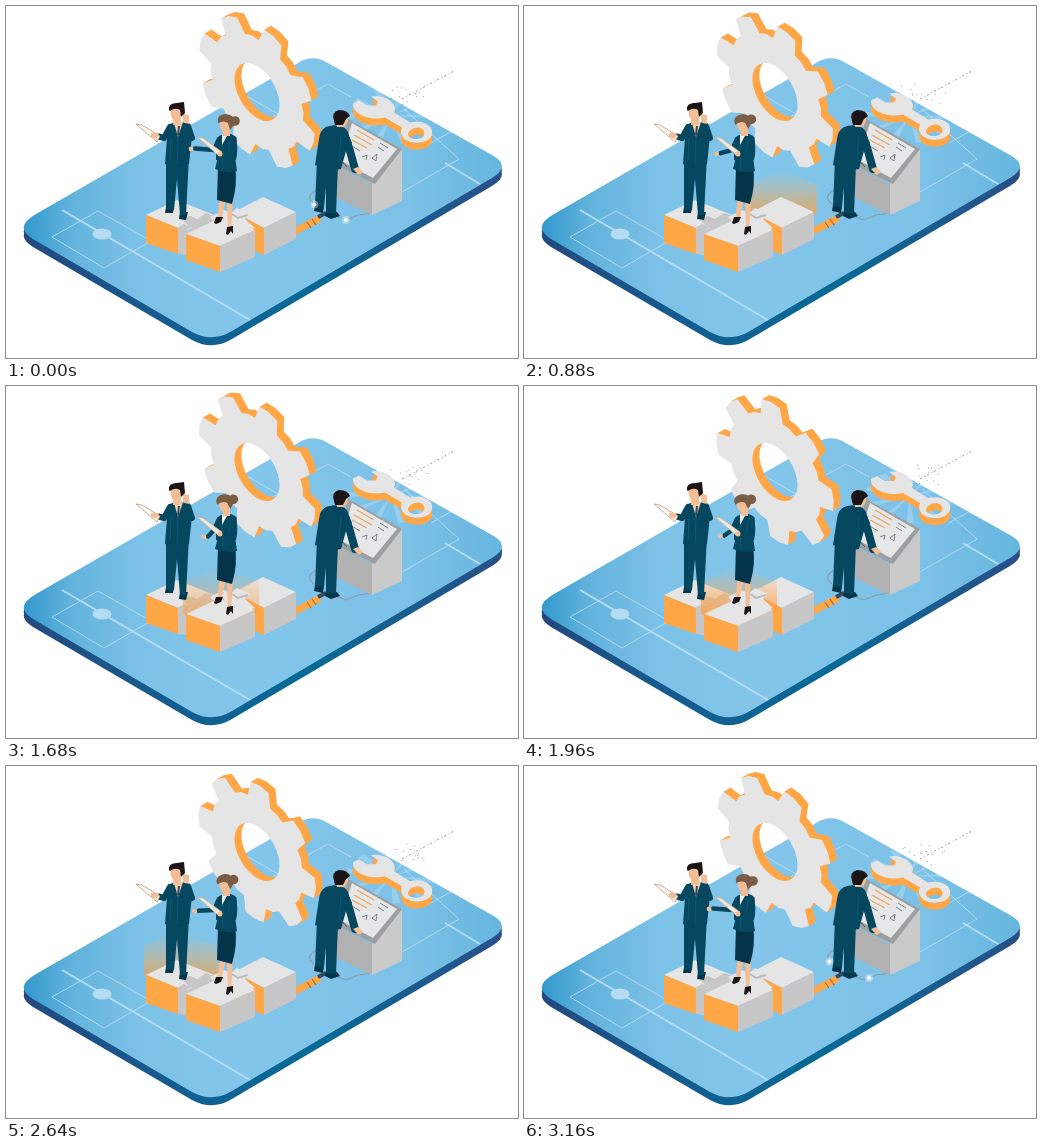
These frames come from a looping animation (512x352 px, 3.2 s). An HTML page:

```html
<!DOCTYPE html>
<html lang="en">
<head>
<meta charset="utf-8">
<title>Isometric teamwork</title>
<style>
html, body { margin: 0; width: 100%; height: 100%; overflow: hidden; background: #fff }
svg { display: block; width: 512px; height: 352px }
.suit { fill: #04475f }
.dark { fill: #03344a }
.skin { fill: #f3bd96 }
.hair { fill: #1b1416 }
.bun { fill: #7b5c45 }
.top { fill: #e5e5e6 }
.side { fill: #c7c7c8 }
.orange { fill: #ffa647 }
.white { fill: #f7f7f7 }
.sleeve { fill: none; stroke: #04475f; stroke-width: 8; stroke-linecap: round; stroke-linejoin: round }
.seam { fill: none; stroke: #0b6078; stroke-width: .8 }
.cable { fill: none; stroke: #8f9ba5; stroke-width: 1.1 }
.field { fill: none; stroke: #b4dcf3; stroke-width: .9 }
</style>
</head>
<body>
<svg viewBox="0 0 512 352">
  <defs>
    <linearGradient id="blue">
      <stop offset="0" stop-color="#3499cd"/><stop offset=".1" stop-color="#62b3dc"/>
      <stop offset=".24" stop-color="#7cc1e7"/><stop offset=".45" stop-color="#84c6eb"/>
      <stop offset=".8" stop-color="#7cc1e8"/><stop offset="1" stop-color="#66b6de"/>
    </linearGradient>
    <linearGradient id="rim">
      <stop offset="0" stop-color="#24497f"/><stop offset=".35" stop-color="#125f92"/>
      <stop offset=".6" stop-color="#076a94"/><stop offset="1" stop-color="#2a4f88"/>
    </linearGradient>
    <linearGradient id="fade" x1="0" y1="1" x2="0" y2="0">
      <stop offset=".2" stop-color="#ff9c38" stop-opacity=".9"/>
      <stop offset="1" stop-color="#ffb870" stop-opacity="0"/>
    </linearGradient>
    <path id="slab" d="M30 208L292 57Q306 48 321 56.500L486 149Q506 160 486 172L226 325Q206 337 186 326L27 233Q7 221 30 208Z"/>
    <clipPath id="onSlab"><use href="#slab"/></clipPath>
    <path id="wrenchFace" fill-rule="evenodd" d="M347 96L353 93L361 98L370 98L372 94L365 89Q375 87 384 93Q391 99 388 105L404 115Q418 112 425 120Q429 128 421 133Q409 138 399 132Q393 126 396 120L379 110Q365 113 354 107Q346 102 347 96ZM404 123Q399 128 406 131Q414 133 418 128Q420 122 413 120Q407 120 404 123Z"/>
    <path id="cog" fill-rule="evenodd"/>
  </defs>

  <use href="#slab" y="8" fill="url(#rim)"/>
  <use href="#slab" y="4" fill="url(#rim)"/>
  <use href="#slab" fill="url(#blue)"/>
  <g clip-path="url(#onSlab)">
    <path class="field" d="M46 231L92 205L145 235L98 262ZM232 85L272 108L250 121M300 90L322 78L345 91M398 103L453 153L396 186M425 137L448 124L478 141"/>
    <path class="field" style="stroke-width:2" d="M56 204L244 314M439 157L474 178"/>
    <ellipse cx="96" cy="228" rx="9.500" ry="5.500" fill="#b5dcf3"/>
    <g id="rays" fill="#fff"></g>
  </g>
  <path d="M396 93L448 65" stroke="#666" stroke-width=".7" stroke-dasharray="2 3 1 2"/>
  <g id="specks" fill="#888"></g>

  <g id="wrench">
    <use href="#wrenchFace" class="orange" y="7"/>
    <use href="#wrenchFace" class="orange" y="4"/>
    <use href="#wrenchFace" class="top"/>
  </g>

  <g id="gear"></g>

  <path class="cable" id="wireA" d="M312 183Q299 190 306 196L317 208"/>
  <path class="cable" id="wireB" d="M367 207L352 209L340 214L324 208"/>
  <path id="plug" d="M282 229L314 212" stroke="#ffa647" stroke-width="7"/>
  <path d="M301 216L305 222M306 213L310 219" stroke="#b96d22" stroke-width="1.200"/>
  <path d="M312 211L320 207" stroke="#34495a" stroke-width="4"/>

  <path class="glow" d="M226 207V179L257 164L293 179V207L258 223Z" fill="url(#fade)"/>
  <g>
    <path class="top" d="M228 206L257 191L290 206L258 222Z"/>
    <path class="orange" d="M228 206L258 222V249L228 235Z"/>
    <path class="side" d="M258 222L290 206V233L258 249Z"/>
  </g>
  <path class="glow" d="M138 209V179L170 166L212 180V212L174 227Z" fill="url(#fade)"/>
  <g>
    <path class="top" d="M140 209L171 194L213 211L179 225Z"/>
    <path class="orange" d="M140 209L172 222V248L140 237Z"/>
    <path class="side" d="M172 222L179 225L213 211V236L180 249L172 248Z"/>
    <path class="side" d="M171 222L178 218L185 221L179 225Z"/>
  </g>
  <path class="side" d="M176 214L184 210L191 213L200 207L212 211L206 216L190 224L183 220Z"/>
  <path class="glow" d="M177 228V196L214 180L253 196V226L214 242Z" fill="url(#fade)"/>
  <g>
    <path class="top" d="M204 211L218 204L225 207L231 202L244 208L239 213L249 222L224 231Z"/>
    <path class="top" d="M180 228L214 212L249 224L214 240Z"/>
    <path class="orange" d="M180 228L214 240V266L180 254Z"/>
    <path class="side" d="M214 240L249 224V251L214 266Z"/>
    <path d="M226 208L232 212L242 209" fill="none" stroke="#bcbcbd" stroke-width="2"/>
  </g>

  <g>
    <path d="M331 160L366 178V209L331 192Z" fill="#b1b1b2"/>
    <path d="M366 178L396 143V195L366 209Z" fill="#cacacb"/>
    <path d="M342 113L396 143L369 178L330 159Z" fill="#9d9fa1"/>
    <path d="M346 117L391 143L367 172L334 154Z" fill="#e6e7e8"/>
    <path d="M351 124L368 134M348 129L366 139M346 134L361 142" stroke="#f1a65a" stroke-width="1.300"/>
    <path d="M374 137L382 142M372 141L378 145M344 139L354 145M356 151L361 149L360 154M366 152L371 148L370 155Z" fill="none" stroke="#777" stroke-width=".9"/>
  </g>

  <g>
    <path class="dark" d="M309 199L318 200L317 207L308 205ZM320 204L331 206L334 210L325 213L319 210Z"/>
    <path class="suit" d="M311 153L332 157L330 208L320 207L320 181L318 201L309 200Z"/>
    <path class="suit" d="M320 121Q330 117 339 122L346 137L340 145L335 163Q323 165 309 159L313 133Q314 124 320 121Z"/>
    <path class="sleeve" d="M338 127L344 145L349 163"/>
    <path class="seam" d="M335 130L333 152L341 161"/>
    <path class="skin" d="M347 163L352 161L357 166L353 169ZM331 115H338V121H331Z"/>
    <ellipse class="skin" cx="336" cy="114" rx="6" ry="6.500"/>
    <path class="hair" d="M328 115Q325 106 333 104Q342 104 344 110L340 113L337 119L329 119Z"/>
  </g>

  <g>
    <path class="dark" d="M160 201H168L167 207L159 207ZM174 206H182L180 214L173 213Z"/>
    <path class="suit" d="M160 151L183 150L180 209H174L171 173L168 204H160Z"/>
    <path class="suit" d="M164 118Q172 113 182 118L186 130L183 158Q172 163 159 158L161 132Z"/>
    <path d="M168 117L177 116L172 131Z" fill="#f6d3b0"/>
    <path d="M172 120L171 129L173 130L174 120Z" fill="#324b5e"/>
    <path class="sleeve" style="stroke-width:6" d="M164 121L158 132L151 130M182 122L186 132L182 120"/>
    <path class="seam" d="M172 131L171 158M165 132L164 154"/>
    <path class="white" d="M130 118L136 119L154 130L151 136Z" stroke="#c08a58" stroke-width=".7"/>
    <path class="skin" d="M145 127L153 127L151 133L145 131ZM167 110H175V119H167ZM177 108L183 109L183 118L177 116Z"/>
    <ellipse class="skin" cx="170" cy="107" rx="5.500" ry="7.500"/>
    <path class="hair" d="M163 104Q162 97 171 97L178 96L179 107L175 111L174 104Q169 101 164 105Z"/>
  </g>

  <g>
    <path class="skin" d="M214 191L220 193L215 215H211ZM221 193L227 193L225 225H222Z"/>
    <path class="hair" d="M210 211L217 211L215 216L210 218L208 217ZM221 221L227 220L227 228L225 225L222 229L220 228Z"/>
    <path class="dark" d="M212 160L229 160Q232 178 226 198L211 194Z"/>
    <path class="suit" d="M213 130Q222 125 229 130Q233 141 230 154Q220 157 210 154L210 141Z"/>
    <path class="suit" d="M212 151H229L231 165Q220 168 209 163Z"/>
    <path class="white" d="M216 128H222L216 139Z"/>
    <path class="seam" d="M216 139L217 163M224 134L222 151"/>
    <path class="sleeve" id="farArm" style="stroke-width:4.500"/>
    <circle class="skin" id="hand" r="2.400"/>
    <path d="M191 131L197 132L216 146L213 150Z" fill="#efe6dd" stroke="#c9a786" stroke-width=".6"/>
    <path class="sleeve" style="stroke-width:5.500" d="M228 133L228 148L218 149"/>
    <circle class="skin" cx="214" cy="148" r="2.500"/>
    <path class="skin" d="M217 121H224V130H217Z"/>
    <g id="head">
      <ellipse class="skin" cx="219" cy="119" rx="5.200" ry="7"/>
      <path class="bun" d="M212 117Q210 109 219 108Q229 108 229 118L224 124L222 117Q218 114 212 117Z"/>
      <circle class="bun" cx="229" cy="115" r="4.800"/>
    </g>
  </g>

  <g id="sparks" fill="#fff"></g>
</svg>
<script>
const LOOP = 3200, STEP = 40;
const $ = id => document.getElementById(id);
const add = (parent, tag, attrs) => {
  const el = document.createElementNS('http://www.w3.org/2000/svg', tag);
  for (const k in attrs) el.setAttribute(k, attrs[k]);
  return parent.appendChild(el);
};
const set = (el, k, v) => el.setAttribute(k, v);
const clamp = v => Math.max(0, Math.min(1, v));
const pulse = (t, from, to) => Math.sin(Math.PI * clamp((t - from) / (to - from)));
const rand = n => { const v = Math.sin(n * 127.1) * 43758.5453; return v - Math.floor(v); };

// Eight-toothed wheel, drawn flat and laid into the isometric wall plane.
const PITCH = 45;
const polar = (r, deg) => {
  const a = deg * Math.PI / 180;
  return `${(r * Math.cos(a)).toFixed(2)} ${(r * Math.sin(a)).toFixed(2)}`;
};
const outline = [];
for (let a = 0; a < 360; a += PITCH)
  outline.push(...[[53, -14], [67, -9], [68, 0], [67, 9], [53, 14], [54, PITCH / 2]].map(([r, d]) => polar(r, a + d)));
set($('cog'), 'd', `M${outline.join('L')}ZM26 0A26 26 0 1 0 -26 0A26 26 0 1 0 26 0Z`);
const layers = [];
for (let d = 8; d >= 0; d--) {
  const plane = add($('gear'), 'g', { transform: `matrix(.866 .5 0 1 ${251 + d * .866} ${86 - d * .5})` });
  layers.push(add(plane, 'use', { href: '#cog', class: d ? 'orange' : 'top' }));
}

for (let i = 0; i < 10; i++)
  add($('rays'), 'path', { d: 'M0 0L44 -4V4Z', opacity: .2, transform: `rotate(${i * 36})` });
const specks = Array.from({ length: 16 }, () => add($('specks'), 'circle', { r: .5 }));
const sparks = [0, 1, 2].map(() => {
  const g = add($('sparks'), 'g', {});
  add(g, 'circle', { r: 4, opacity: .35 });
  add(g, 'circle', { r: 1.9 });
  return g;
});

const glows = [...document.querySelectorAll('.glow')];
const spans = [[560, 1300, .9], [2300, 3020, .85], [1400, 2520, .9]];

function moveSpark(g, wire, p, back) {
  set(g, 'opacity', p > 0 && p < 1 ? 1 : 0);
  const q = wire.getPointAtLength(wire.getTotalLength() * (back ? 1 - p : p));
  set(g, 'transform', `translate(${q.x} ${q.y})`);
}

function draw(t) {
  const turn = -119 - 4 * PITCH * t / LOOP;
  layers.forEach(l => set(l, 'transform', `rotate(${turn})`));
  set($('rays'), 'transform', `translate(385 110) scale(1 .62) rotate(${t * 36 / 800})`);

  glows.forEach((g, i) => {
    const [from, to, peak] = spans[i];
    set(g, 'opacity', pulse(t, from, to) * peak);
  });

  const charge = (t + 200) % LOOP / 320;
  moveSpark(sparks[0], $('wireA'), charge);
  moveSpark(sparks[1], $('wireB'), charge);
  moveSpark(sparks[2], $('plug'), (t - 480) / 400, true);

  const wave = (1 - Math.cos(t / LOOP * 2 * Math.PI)) / 2;
  const hx = 185 + 13 * wave, hy = 143 + 8 * wave;
  set($('farArm'), 'd', `M213 133L208 144L${hx + 4} ${hy - .5}`);
  set($('hand'), 'cx', hx);
  set($('hand'), 'cy', hy);
  set($('head'), 'transform', `rotate(${-12 * Math.min(1, wave * 3)} 220 122)`);
  set($('wrench'), 'transform', `translate(0 ${1.5 - 5 * wave})`);

  const beat = Math.floor(t / 160);
  specks.forEach((s, i) => {
    set(s, 'cx', 376 + rand(i + beat * 17 + 1) * 46);
    set(s, 'cy', 78 + rand(i + beat * 31 + 9) * 13 + i % 2 * 8);
  });
}

function tick() {
  draw(Math.floor(performance.now() % LOOP / STEP) * STEP);
  requestAnimationFrame(tick);
}
tick();
</script>
</body>
</html>
```
